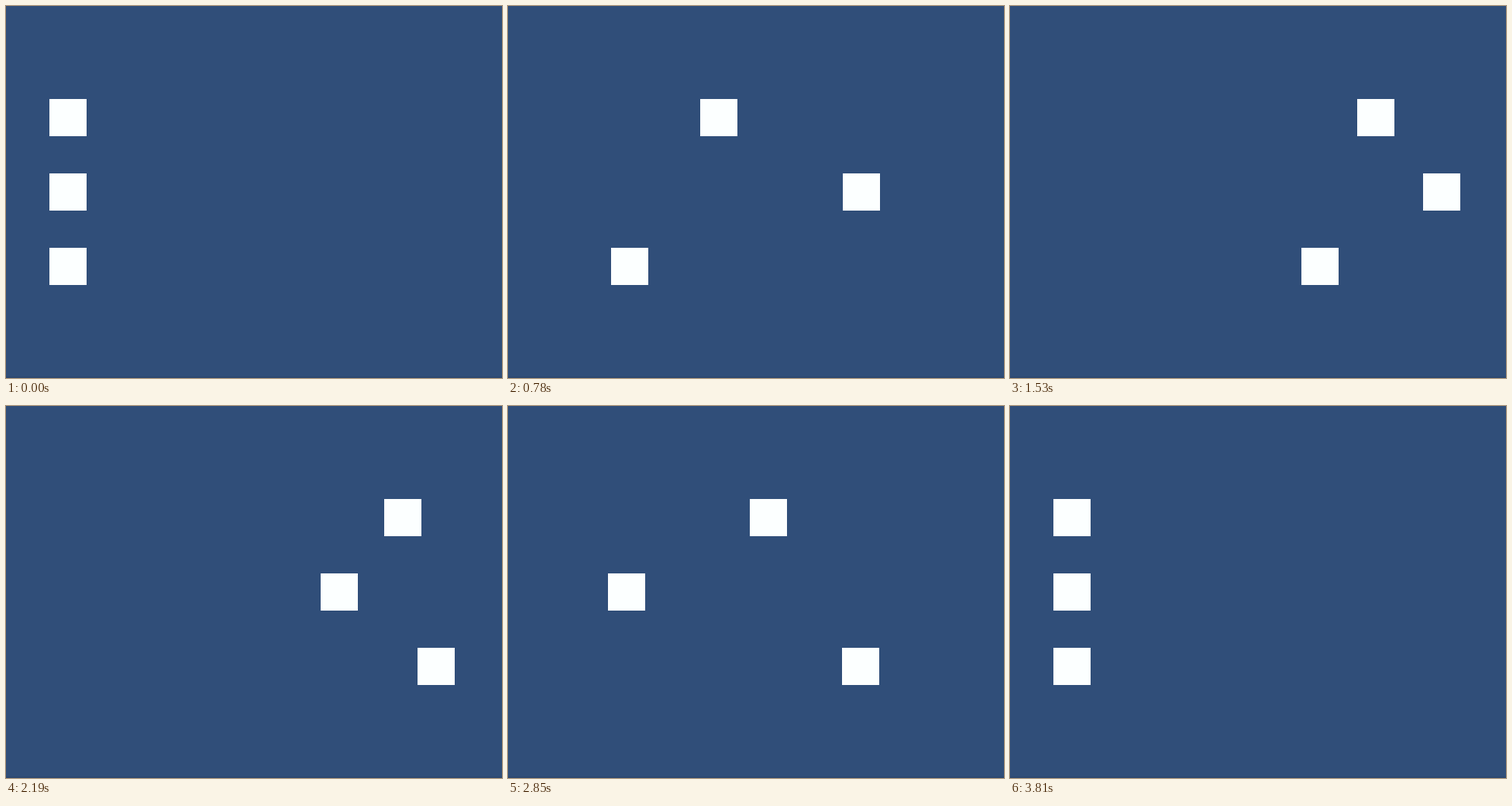
These frames come from a looping animation (640x480 px, 3.94 s). An HTML page with a canvas:

```html
<!DOCTYPE html>
<html lang="en">
<head>
<meta charset="utf-8">
<title>Easing squares</title>
<style>
  html, body { margin: 0; width: 100%; height: 100%; overflow: hidden; background: #304e79; }
  canvas { display: block; }
</style>
</head>
<body>
<canvas id="stage" width="640" height="480"></canvas>
<script>
const ctx = document.getElementById('stage').getContext('2d');
const LOOP = 3940, STEP = 30, TRAVEL = 1800;
const LEFT = 56, RANGE = 480, SIZE = 48;

// linear, cubic ease-out, quadratic ease-in
const easings = [p => p, p => 1 - (1 - p) ** 3, p => p * p];

const progress = (t, start) => Math.min(1, Math.max(0, (t - start) / TRAVEL));

function draw(now) {
  const t = Math.floor(now % LOOP / STEP) * STEP;
  const out = progress(t, 60), back = progress(t, 2010);

  ctx.fillStyle = '#304e79';
  ctx.fillRect(0, 0, 640, 480);
  ctx.fillStyle = '#2c4870';
  ctx.fillRect(0, 478, 640, 2);

  ctx.fillStyle = '#fcffff';
  easings.forEach((ease, row) => {
    const x = LEFT + RANGE * (ease(out) - ease(back));
    ctx.fillRect(Math.round(x), 120 + row * 96, SIZE, SIZE);
  });
}

const start = performance.now();
function tick() {
  draw(performance.now() - start);
  requestAnimationFrame(tick);
}
tick();
</script>
</body>
</html>
```
